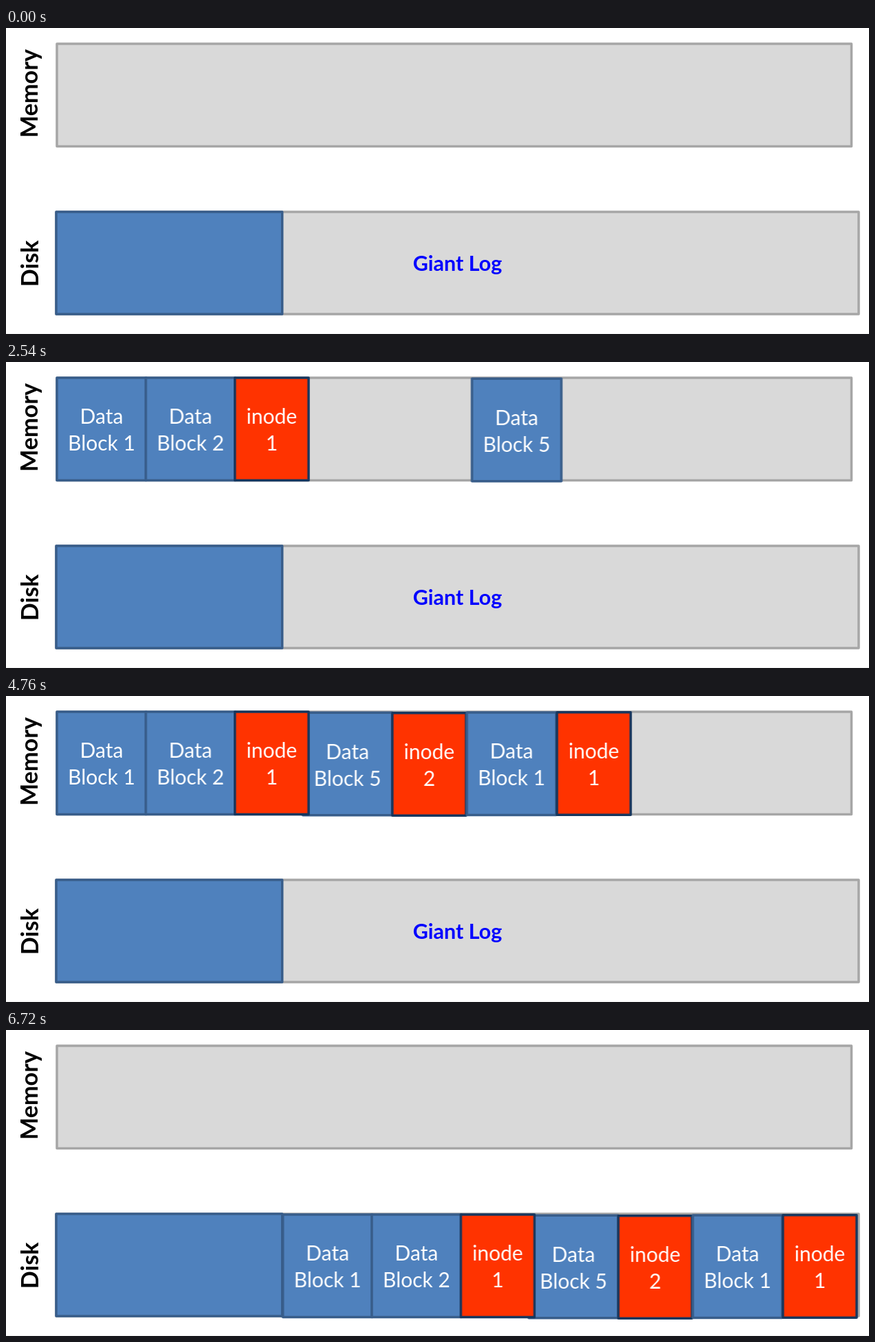
These frames come from a looping animation (1255 by 446 pixels, 8000 ms). An HTML page:

```html
<!DOCTYPE html>
<html lang="en">
<head>
<meta charset="utf-8">
<title>Log-structured writes</title>
<style>
  html, body { margin: 0; width: 100%; height: 100%; overflow: hidden; background: #fff; }
  svg { display: block; width: 100%; height: 100%; }
  text { font-family: Lato, Inter, sans-serif; font-size: 30px; text-anchor: middle; }
  rect { stroke-width: 3.5; stroke-linejoin: round; }
  .area { fill: #d9d9d9; stroke: #a6a6a6; }
  .data { fill: #4f81bd; stroke: #385d8a; }
  .inode { fill: #ff3300; stroke: #17375e; }
  .label { fill: #fff; }
  .title { font-weight: 700; font-size: 34.2px; }
  .log { font-weight: 700; font-size: 30.5px; fill: #00f; }

  #segment { animation: flush 8s infinite; }
  @keyframes flush {
    0%, 59.56% { transform: none; animation-timing-function: cubic-bezier(.42, 0, .7, .25); }
    71.8% { transform: translate(164.3px, 123px); animation-timing-function: cubic-bezier(.3, .75, .58, 1); }
    84%, 100% { transform: translate(328.6px, 246px); }
  }
</style>
</head>
<body>
<svg viewBox="0 0 1255 446">
  <path d="M0 445.5H1255" stroke="#f2f2f2"/>
  <text class="title" transform="translate(46 95.5) rotate(-90)">Memory</text>
  <text class="title" transform="translate(46.5 343.3) rotate(-90)">Disk</text>
  <rect class="area" x="74" y="23" width="1155.5" height="149.5"/>
  <rect class="area" x="73" y="268" width="1167" height="149"/>
  <rect class="data" x="73" y="268" width="328.7" height="149"/>
  <text class="log" x="656.5" y="354">Giant Log</text>
  <g id="segment"></g>
</svg>
<script>
  const LOOP = 8000, FLIGHT = 500, STAGE_WIDTH = 1255;
  const WIDTH = { data: 130, inode: 107.2 };

  // Listed from back to front; start is when the block enters from the right, in ms.
  const blocks = [
    { kind: 'data',  lines: ['Data', 'Block 1'], x: 74,    y: 23,   start: 620 },
    { kind: 'data',  lines: ['Data', 'Block 2'], x: 203.3, y: 23,   start: 1141 },
    { kind: 'data',  lines: ['Data', 'Block 5'], x: 431.6, y: 24.3, start: 2190 },
    { kind: 'inode', lines: ['inode', '1'],      x: 332.8, y: 23,   start: 1665 },
    { kind: 'inode', lines: ['inode', '2'],      x: 561.8, y: 24.8, start: 2715 },
    { kind: 'data',  lines: ['Data', 'Block 1'], x: 670.2, y: 24,   start: 3293 },
    { kind: 'inode', lines: ['inode', '1'],      x: 801.2, y: 23.7, start: 3810 }
  ];

  const percent = ms => (ms / LOOP * 100).toFixed(3) + '%';

  const flyIn = ({ x, start }, i) => `
    @keyframes fly${i} {
      0%, ${percent(start)} { transform: translateX(${STAGE_WIDTH + 2 - x}px); }
      ${percent(start + FLIGHT)}, 100% { transform: none; }
    }`;

  const draw = ({ kind, lines, x, y }, i) => {
    const width = WIDTH[kind], middle = x + width / 2;
    const labels = lines.map((line, row) =>
      `<text class="label" x="${middle}" y="${y + 67.4 + row * 39}">${line}</text>`).join('');
    return `<g style="animation: fly${i} ${LOOP}ms linear infinite">
      <rect class="${kind}" x="${x}" y="${y}" width="${width}" height="149.5"/>${labels}</g>`;
  };

  const style = document.createElement('style');
  style.textContent = blocks.map(flyIn).join('');
  document.head.append(style);
  document.getElementById('segment').innerHTML = blocks.map(draw).join('');
</script>
</body>
</html>
```
